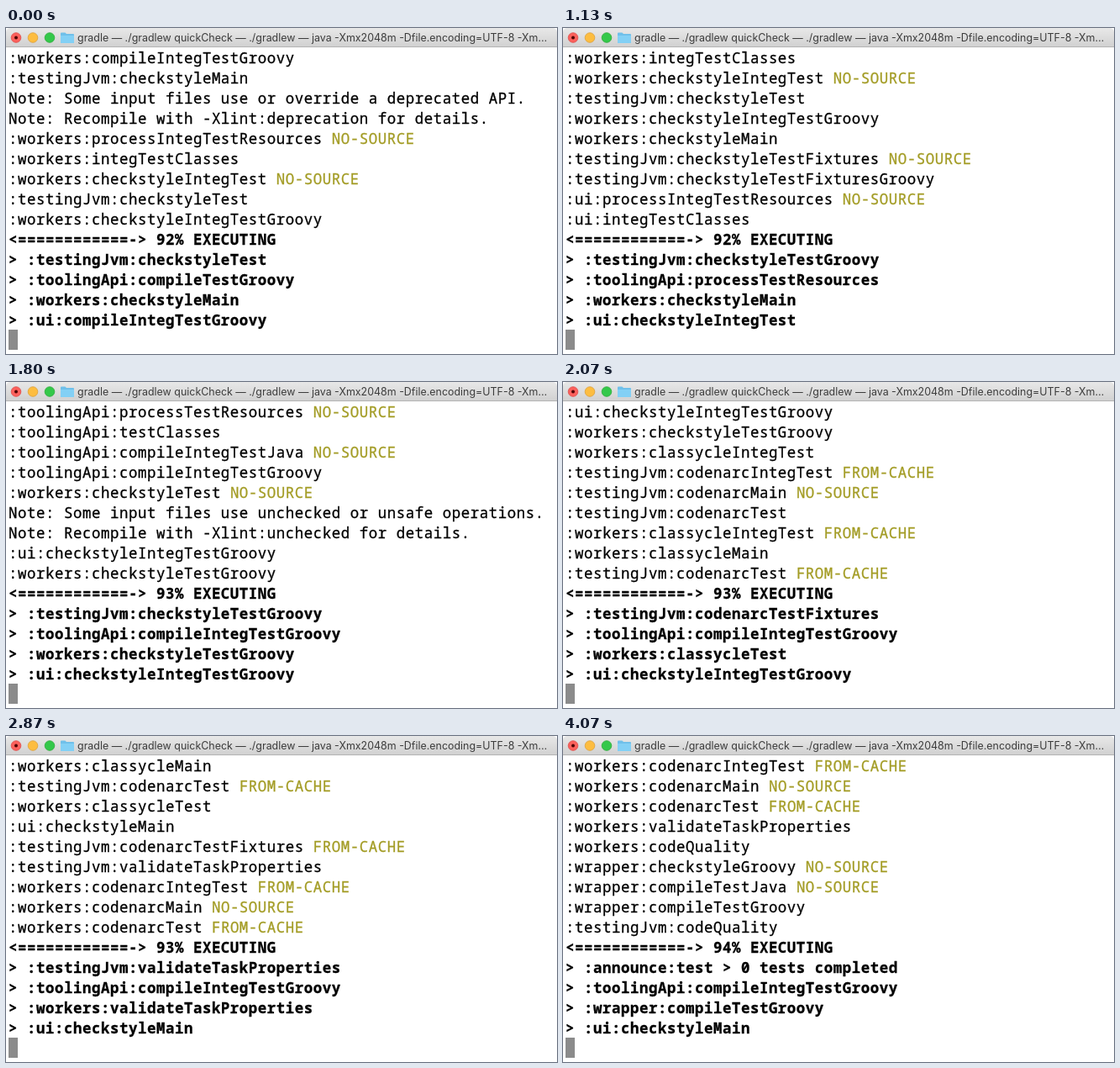
These frames come from a looping animation (656x388 px, 5130 ms). An HTML page:

```html
<!DOCTYPE html>
<html lang="en">
<head>
<meta charset="utf-8">
<title>Build console</title>
<style>
  html, body { margin: 0; height: 100%; overflow: hidden; background: #fff; }
  #bar { position: absolute; inset: 0 0 auto; height: 23px; box-sizing: border-box;
    background: linear-gradient(#e8e8e8, #d1d1d1); border-bottom: 1px solid #b4b4b4; border-radius: 5px 5px 0 0; }
  #bar svg { position: absolute; left: 0; top: 0; }
  #bar text { font: 12.44px Inter, "Open Sans", sans-serif; fill: #3c3c3c; }
  #screen { position: absolute; left: 3px; top: 23px; margin: 0; color: #000;
    font: 17.4px/24px "Noto Sans Mono", "DejaVu Sans Mono", monospace; letter-spacing: .56px;
    -webkit-text-stroke: .3px; }
  #screen b { font-weight: 700; }
  #screen i { font-style: normal; color: #a39c25; }
  #screen s { text-decoration: none; color: #7f7f7f; }
  #cursor { position: absolute; left: 3px; top: 359px; width: 11px; height: 24px; background: #8b8b8b; }
</style>
</head>
<body>
<div id="bar">
  <svg width="656" height="22">
    <g stroke-width=".8">
      <circle cx="12" cy="11.5" r="5.8" fill="#fc615c" stroke="#df4744"/>
      <circle cx="32" cy="11.5" r="5.8" fill="#fdbd40" stroke="#de9f34"/>
      <circle cx="52" cy="11.5" r="5.8" fill="#34c84a" stroke="#27aa35"/>
    </g>
    <circle cx="12" cy="11.5" r="2" fill="#4d0000"/>
    <path d="M65 6.5q0-1 1-1h4.5l1.5 1.5h8q1 0 1 1v9q0 1-1 1h-14q-1 0-1-1z" fill="#6fc0ea"/>
    <path d="M65 9h16v8q0 1-1 1h-14q-1 0-1-1z" fill="#83d0f5"/>
    <text x="85" y="16">gradle — ./gradlew quickCheck — ./gradlew — java -Xmx2048m -Dfile.encoding=UTF-8 -Xm…</text>
  </svg>
</div>
<pre id="screen"></pre>
<div id="cursor"></div>
<script>
const LOOP = 5130, ROWS = 9;

// A trailing "!" means NO-SOURCE, a trailing "*" means FROM-CACHE.
const log = `:workers:compileIntegTestGroovy
:testingJvm:checkstyleMain
Note: Some input files use or override a deprecated API.
Note: Recompile with -Xlint:deprecation for details.
:workers:processIntegTestResources!
:workers:integTestClasses
:workers:checkstyleIntegTest!
:testingJvm:checkstyleTest
:workers:checkstyleIntegTestGroovy
:workers:checkstyleMain
:testingJvm:checkstyleTestFixtures!
:testingJvm:checkstyleTestFixturesGroovy
:ui:processIntegTestResources!
:ui:integTestClasses
:ui:checkstyleIntegTest
:testingJvm:checkstyleTestGroovy
:toolingApi:processTestResources!
:toolingApi:testClasses
:toolingApi:compileIntegTestJava!
:toolingApi:compileIntegTestGroovy
:workers:checkstyleTest!
Note: Some input files use unchecked or unsafe operations.
Note: Recompile with -Xlint:unchecked for details.
:ui:checkstyleIntegTestGroovy
:workers:checkstyleTestGroovy
:workers:classycleIntegTest
:testingJvm:codenarcIntegTest*
:testingJvm:codenarcMain!
:testingJvm:codenarcTest
:workers:classycleIntegTest*
:workers:classycleMain
:testingJvm:codenarcTest*
:workers:classycleTest
:ui:checkstyleMain
:testingJvm:codenarcTestFixtures*
:testingJvm:validateTaskProperties
:workers:codenarcIntegTest*
:workers:codenarcMain!
:workers:codenarcTest*
:workers:validateTaskProperties
:workers:codeQuality
:wrapper:checkstyleGroovy!
:wrapper:compileTestJava!
:wrapper:compileTestGroovy
:testingJvm:codeQuality`.split("\n");

// [start ms, first log line, changed workers by slot, percent if changed]
const steps = [
  [0, 0, { 0: ":testingJvm:checkstyleTest", 1: ":toolingApi:compileTestGroovy",
           2: ":workers:checkstyleMain", 3: ":ui:compileIntegTestGroovy" }, 92],
  [400, 1, { 0: ":testingJvm:checkstyleTestFixtures" }],
  [470, 2, { 0: ":testingJvm:checkstyleTestFixturesGroovy" }],
  [670, 5, { 3: ":ui:checkstyleIntegTest" }],
  [930, 5, { 0: "IDLE" }],
  [1000, 5, { 0: ":testingJvm:checkstyleTestGroovy" }],
  [1130, 5, { 1: ":toolingApi:processTestResources" }],
  [1270, 8, { 1: ":toolingApi:compileIntegTestJava", 2: ":workers:checkstyleTest" }],
  [1330, 11, { 1: ":toolingApi:compileIntegTestGroovy" }, 93],
  [1600, 12, { 2: ":workers:checkstyleTestGroovy", 3: "IDLE" }],
  [1670, 14, {}],
  [1800, 16, { 3: ":ui:checkstyleIntegTestGroovy" }],
  [1870, 17, { 0: ":testingJvm:codenarcIntegTest", 2: ":workers:classycleIntegTest" }],
  [2000, 20, { 0: ":testingJvm:codenarcTest" }],
  [2070, 23, { 0: ":testingJvm:codenarcTestFixtures", 2: ":workers:classycleTest" }],
  [2200, 24, {}],
  [2270, 26, { 0: ":testingJvm:validateTaskProperties", 3: ":ui:checkstyleMain" }],
  [2470, 27, { 2: ":workers:codenarcIntegTest" }],
  [2530, 28, { 2: ":workers:codenarcMain" }],
  [2670, 29, { 2: ":workers:codenarcTest" }],
  [2730, 30, { 2: "IDLE" }],
  [2870, 30, { 2: ":workers:validateTaskProperties" }],
  [3130, 32, { 2: ":wrapper:checkstyleGroovy" }, 94],
  [3270, 34, { 2: ":wrapper:compileTestGroovy" }],
  [3600, 35, { 0: "IDLE" }],
  [3670, 36, { 0: ":announce:test" }],
  [4070, 36, { 0: ":announce:test > 0 tests completed" }],
];

const logRow = s => s.replace("!", " <i>NO-SOURCE</i>").replace("*", " <i>FROM-CACHE</i>");
const escape = s => s.replace(/</g, "&lt;").replace(/>/g, "&gt;");
const bold = s => `<b>${escape(s)}</b>`;
const workerRow = s => s === "IDLE" ? "<s>&gt; IDLE</s>" : bold("> " + s);

let workers = [], percent;
const screens = steps.map(([at, top, changes, pct = percent]) => {
  percent = pct;
  workers = Object.assign([...workers], changes);
  const rows = [
    ...log.slice(top, top + ROWS).map(logRow),
    bold(`<${"=".repeat(12)}-> ${pct}% EXECUTING`),
    ...workers.map(workerRow),
  ];
  return { at, html: rows.join("\n") };
});

const view = document.getElementById("screen");
const start = performance.now();
let shown;
function draw() {
  const t = (performance.now() - start) % LOOP;
  const now = screens.findLast(s => s.at <= t);
  if (now !== shown) view.innerHTML = (shown = now).html;
  requestAnimationFrame(draw);
}
draw();
</script>
</body>
</html>
```
